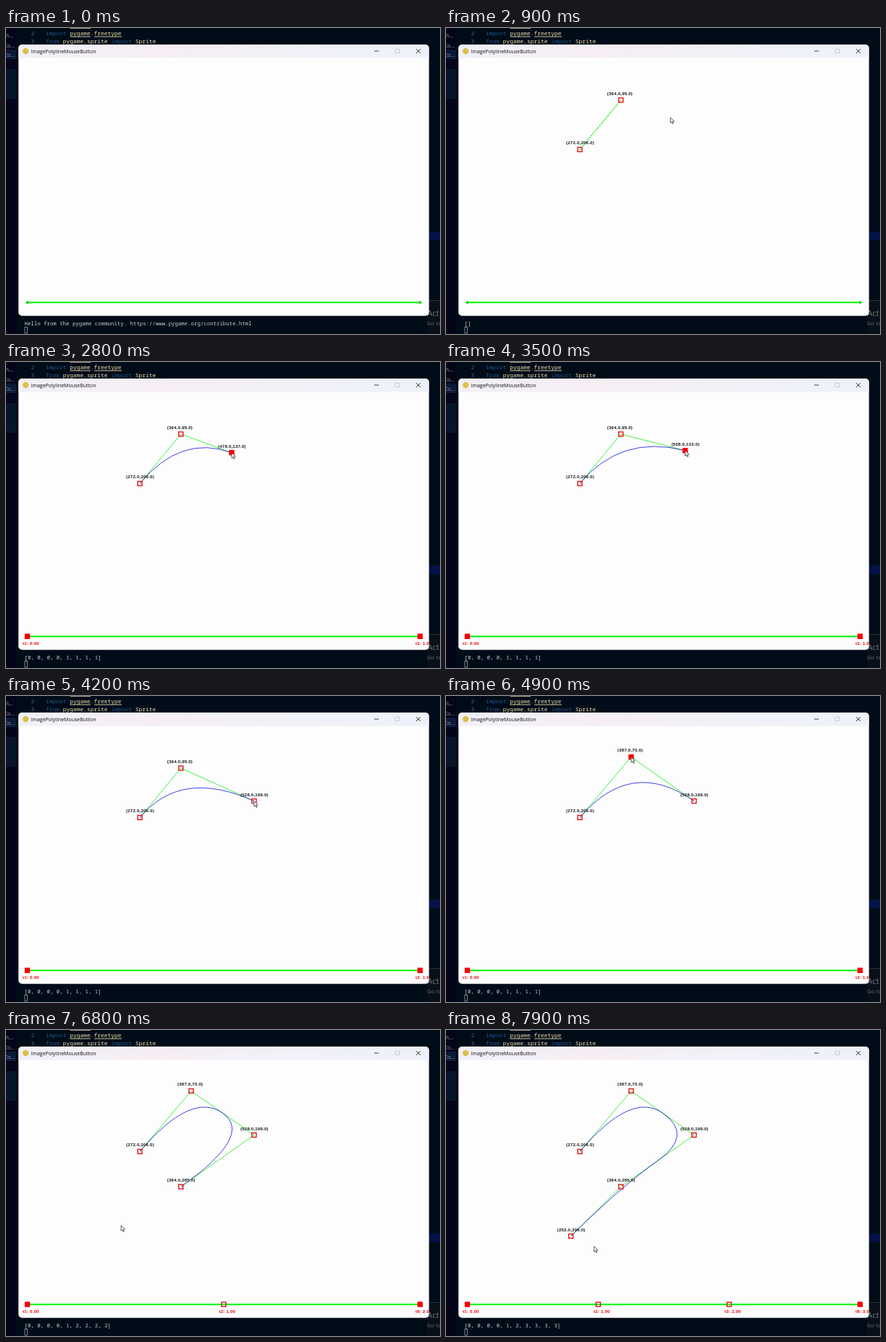
Write an HTML page with a canvas that moves like this. It is 600 by 424 pixels and loops after 8 s.

```html
<!DOCTYPE html>
<html lang="en">
<head>
<meta charset="utf-8">
<title>Polyline editor</title>
<style>
  html, body { margin: 0; width: 100%; height: 100%; overflow: hidden; background: #000c18; }
  canvas { display: block; width: 600px; height: 424px; }
</style>
</head>
<body>
<canvas id="stage" width="600" height="424"></canvas>
<script>
const ctx = document.getElementById('stage').getContext('2d');
const LOOP = 8000, STEP = 100, REST = 200;
const MENU_OPEN = 1200, SPLINE_ON = 1900;
const CODE = '7.92px "Noto Sans Mono", monospace';
const TERM = '7.38px "Noto Sans Mono", monospace';
const LABEL = 'bold 6.1px "Liberation Sans", Arial, sans-serif';
const ui = size => size + 'px "Open Sans", sans-serif';
const MENU = ['Normal', 'DrawLine with DrawPoint', 'Barycentric coordinates',
  'Lagrange Interpolation', 'Cubic Bezier', 'Cubic Hermite', 'Cubic B-spline'];

// Where the pointer arrives, in the app's own coordinates; it rests, then glides on
const stops = [
  [100, 170, 320], [300, 272, 206], [700, 364, 95], [900, 475, 134], [1000, 476, 137],
  [1700, 559, 346], [2500, 476, 137], [3400, 508, 132], [4000, 528, 169], [4300, 364, 95],
  [4800, 387, 70], [5400, 364, 285], [6600, 230, 372], [7500, 252, 396], [7900, 304, 419]
].map(([time, x, y]) => ({ time, x, y }));

// A point is born under the pointer and follows it between grab and drop
const points = [
  { born: 300 },
  { born: 700, grab: 4500, drop: 5000 },
  { born: 1000, grab: 2700, drop: 4100 },
  { born: 5600 },
  { born: 7700 }
];

const toStage = ([x, y]) => [17.2 + 0.617 * x, 41.3 + 0.617 * y];
const clamp = (v, lo, hi) => Math.min(hi, Math.max(lo, v));

function pointer(t) {
  const i = Math.max(0, stops.findLastIndex(s => s.time <= t));
  const a = stops[i], b = stops[i + 1] || a;
  const leave = Math.min(a.time + REST, b.time);
  const u = clamp((t - leave) / (b.time - leave || 1), 0, 1), e = u * u * (3 - 2 * u);
  return [a.x + (b.x - a.x) * e, a.y + (b.y - a.y) * e];
}

const place = (p, t) => pointer(t >= p.grab ? Math.min(t, p.drop - STEP) : p.born);

function rect(x, y, w, h, color) {
  ctx.fillStyle = color;
  ctx.fillRect(x, y, w, h);
}

function box(x, y, w, h, color, width) {
  ctx.strokeStyle = color;
  ctx.lineWidth = width;
  ctx.strokeRect(x, y, w, h);
}

function disc(x, y, r, color) {
  ctx.beginPath();
  ctx.arc(x, y, r, 0, 2 * Math.PI);
  ctx.fillStyle = color;
  ctx.fill();
}

function text(str, x, y, font, color) {
  ctx.font = font;
  ctx.letterSpacing = font === LABEL ? '0.2px' : '0px';
  ctx.fillStyle = color;
  ctx.fillText(str, x, y);
}

function line(pts, color, width) {
  ctx.beginPath();
  pts.forEach(([x, y]) => ctx.lineTo(x, y));
  ctx.strokeStyle = color;
  ctx.lineWidth = width;
  ctx.stroke();
}

function handle(x, y, solid) {
  if (solid) rect(x - 3.7, y - 3.7, 7.4, 7.4, '#fa0008');
  else box(x - 3, y - 3, 6, 6, '#e01414', 1.4);
}

function knots(n) {
  if (n < 3) return '[]';
  return '[' + Array.from({ length: n + 5 }, (_, i) => clamp(i - 3, 0, n - 2)).join(', ') + ']';
}

function codeLine(y, num, words) {
  text(num, 34.5, y, CODE, '#3f6080');
  let x = 55;
  words.split(' ').forEach((word, i) => {
    text(word, x, y, CODE, i % 2 ? '#f3e0ae' : '#225588');
    x += (word.length + 1) * 4.76;
  });
}

function drawEditor(count) {
  rect(0, 0, 600, 424, '#000c18');
  rect(0, 0, 14, 424, '#050519');
  rect(0, 30, 14, 13, '#0a1a38');
  rect(0, 57, 14, 41, '#07152a');
  ['i\\...', 'Co...', 'Co...'].forEach((s, i) => text(s, i ? -2.5 : 0, 13 + 13.5 * i, ui(7.2), '#979fae'));

  codeLine(9.7, '2', 'import pygame.freetype');
  codeLine(21, '3', 'from pygame.sprite import Sprite');
  rect(88.5, 0, 28.5, 1, '#aaa184');
  rect(88.5, 11.5, 28.5, 1, '#d0c39c');
  rect(122, 11.5, 38, 1, '#d0c39c');

  rect(585, 282, 15, 12, '#051247');
  rect(582, 377, 18, 47, '#0a1019');
  rect(582, 377, 18, 1, '#2b323a');
  text('Act', 582.5, 399, ui(11), '#73777d');
  text('Go to', 582, 412, ui(8), '#666b72');

  const greeting = 'Hello from the pygame community. https://www.pygame.org/contribute.html';
  text(count ? knots(count) : greeting, 25.5, 411.7, TERM, '#c8ccd0');
  box(26, 414.5, 3.4, 8.5, '#9a9ea4', 0.8);
}

function drawWindow() {
  ctx.beginPath();
  ctx.roundRect(17.3, 23, 567.4, 375.8, 5);
  ctx.strokeStyle = '#50545c';
  ctx.lineWidth = 0.8;
  ctx.stroke();
  ctx.clip();
  rect(17, 23, 568, 376, '#fefdfe');
  const bar = ctx.createLinearGradient(17, 0, 585, 0);
  ['#f1f0f8', '#f6eef4', '#f1f1f8', '#eef1f9'].forEach((c, i) => bar.addColorStop(i / 3, c));
  rect(17, 23, 568, 18.5, bar);

  disc(27.2, 32, 4.2, '#dcc04a');
  text('ImagePolylineMouseButton', 34.5, 34.6, ui(7), '#141418');
  line([[509, 32], [515.5, 32]], '#333', 0.9);
  box(538.2, 29.2, 5.4, 5.4, '#c3c3c9', 0.8);
  line([[567, 29.2], [573, 35]], '#222', 0.9);
  line([[573, 29.2], [567, 35]], '#222', 0.9);
}

function drawSlider(count, spline) {
  const x0 = 29.5, x1 = 572.5, y = 380.2;
  line([[x0, y], [x1, y]], '#00f50a', 1.9);
  if (!spline) {
    disc(x0, y, 2, '#00e00a');
    disc(x1, y, 2, '#00e00a');
    return;
  }
  const spans = count - 2;
  for (let i = 0; i <= spans; i++) {
    const x = x0 + (x1 - x0) * i / spans, end = i === spans;
    handle(x, y, i === 0 || end);
    // The repeated end knots pile up on one label
    const id = end && spans > 1 ? 8 : i + 1;
    text(`t${id}: ${i.toFixed(2)}`, x - 6.5, 392, LABEL, '#f00000');
  }
}

// Clamped uniform quadratic B-spline
function drawSpline(p) {
  const last = p.length - 1;
  ctx.beginPath();
  ctx.moveTo(...p[0]);
  for (let i = 1; i < last; i++) {
    const [x, y] = p[i], [nx, ny] = p[i + 1];
    if (i === last - 1) ctx.quadraticCurveTo(x, y, nx, ny);
    else ctx.quadraticCurveTo(x, y, (x + nx) / 2, (y + ny) / 2);
  }
  ctx.strokeStyle = '#1010dc';
  ctx.lineWidth = 0.8;
  ctx.stroke();
}

function drawShape(live, t, spline) {
  const raw = live.map(p => place(p, t));
  const pos = raw.map(toStage);
  if (!spline) ctx.setLineDash([1.8, 1.2]);
  line(pos, '#10ee10', spline ? 0.8 : 1.4);
  ctx.setLineDash([]);
  if (spline) drawSpline(pos);
  live.forEach((p, i) => {
    const [x, y] = pos[i];
    handle(x, y, t >= p.grab && t < p.drop);
    const label = raw[i].map(v => Math.round(v).toFixed(1)).join();
    text(`(${label})`, x - 19, y - 7, LABEL, '#1a1a1a');
  });
}

function drawMenu(my) {
  const row = 19.1, top = 131;
  rect(311, 127.5, 92.3, 141.5, '#c6c5c7');
  MENU.forEach((item, i) => {
    const y = top + i * row;
    const hover = my >= y && my < y + row;
    rect(314, y, 86, 18.3, hover ? '#e3e1e3' : '#fdfcfd');
    text(item, 317, y + 11.2, LABEL, '#1a1a1a');
  });
}

const arrow = new Path2D('M0 0V7.5L1.8 5.9 3 8.7 4.2 8.2 3 5.5 5.3 5.3Z');

function drawPointer(x, y) {
  ctx.translate(x, y);
  ctx.fillStyle = '#fff';
  ctx.fill(arrow);
  ctx.strokeStyle = '#333';
  ctx.lineWidth = 0.8;
  ctx.stroke(arrow);
}

function draw(t) {
  const [mx, my] = toStage(pointer(t));
  const live = points.filter(p => t >= p.born);
  const spline = t >= SPLINE_ON;
  ctx.save();
  drawEditor(live.length);
  drawWindow();
  drawShape(live, t, spline);
  drawSlider(live.length, spline);
  if (t >= MENU_OPEN && !spline) drawMenu(my);
  if (t >= stops[0].time) drawPointer(mx, my);
  ctx.restore();
}

const start = performance.now();
function tick() {
  const t = (performance.now() - start) % LOOP;
  draw(Math.floor(t / STEP) * STEP);
  requestAnimationFrame(tick);
}
tick();
</script>
</body>
</html>
```
